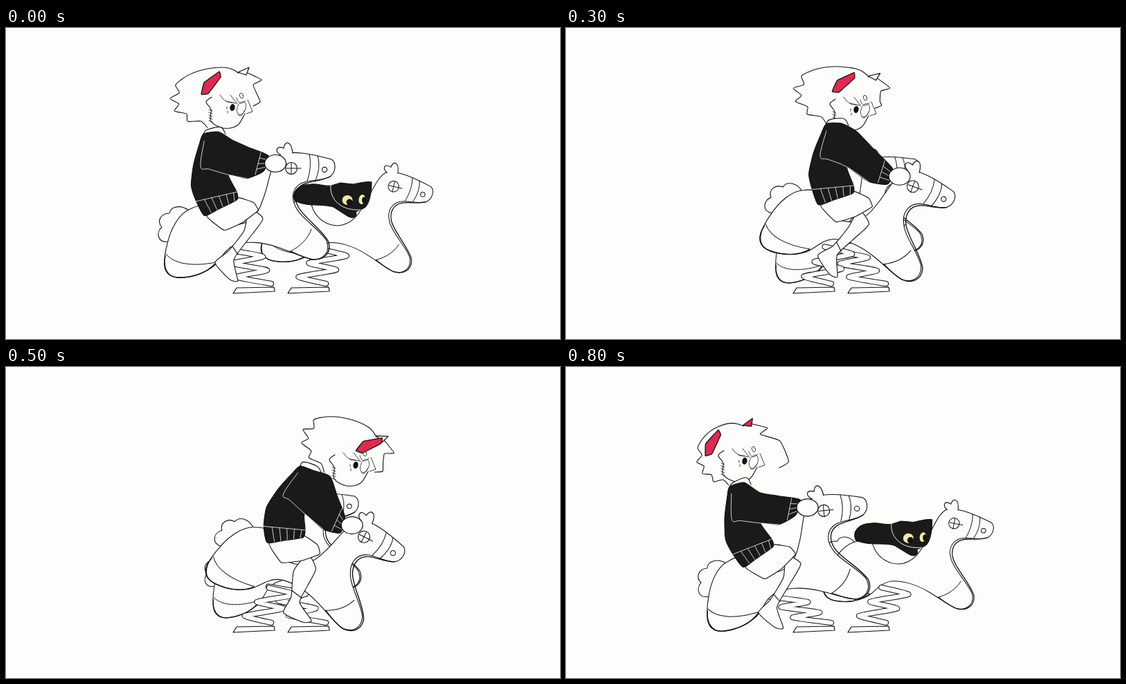
These frames come from a looping animation (800 by 450 pixels, 900 ms). An HTML page with a canvas:

```html
<!DOCTYPE html>
<html lang="en">
<head>
<meta charset="utf-8">
<title>Rocking horses</title>
<style>
  html, body { margin: 0; width: 100%; height: 100%; overflow: hidden; background: #fdfdfb; }
  canvas { display: block; }
</style>
</head>
<body>
<canvas width="800" height="450"></canvas>
<script>
const ctx = document.querySelector('canvas').getContext('2d');
const PAPER = '#fdfdfb', INK = '#111', CLOTH = '#1a1a1a', RED = '#dd2a50', YELLOW = '#f1eda0';
const STEP = 100, FAR_SCALE = 0.91;

// Horses: x, y, angle. Head: eye x, y, tilt. Hair: turn of the ear, backward flow.
// Body: lean of the torso, ankle position along the horse, foot angle.
const upright = { near: [403, 172, 0], far: [558, 200, 13], head: [327, 115, 0], hair: [-31, 90], body: [-5, -78, 40] };
const rising = { near: [429, 167, 3], far: [517, 187, 6], head: [352, 104, 2], hair: [-25, 88], body: [-4, -71, 41] };
const leaning = { near: [503, 197, 20], far: [442, 181, -7], head: [419, 118, 11], hair: [-25, 95], body: [1, -65, 49] };
const diving = { near: [523, 214, 27], far: [441, 177, -6], head: [505, 142, 26], hair: [5, 91], body: [21, -38, 17] };
const sitting = { near: [432, 170, 5], far: [549, 190, 11], head: [388, 116, 1], hair: [-20, 63], body: [8, -41, -8] };
const backward = { near: [360, 178, -6], far: [558, 197, 11.5], head: [258, 136, -12], hair: [-40, 68], body: [-14, -77, 33] };

const mix = (a, b, t) => a.map((v, i) => v + (b[i] - v) * t);
const between = (a, b) => Object.fromEntries(Object.keys(a).map(k => [k, mix(a[k], b[k], 0.5)]));
const poses = [
  upright, between(upright, rising), rising,
  leaning, between(leaning, diving), diving,
  sitting, { ...between(sitting, backward), far: [577, 206, 15] }, backward
];

const radians = degrees => degrees * Math.PI / 180;

// Points given relative to an origin that is turned by an angle.
function local([x, y], angle, ...points) {
  const c = Math.cos(radians(angle)), s = Math.sin(radians(angle));
  return points.map(([dx, dy]) => [x + dx * c - dy * s, y + dx * s + dy * c]);
}

function paint(path, stroke, fill, width = 1.1) {
  if (fill) { ctx.fillStyle = fill; ctx.fill(path); }
  if (stroke) { ctx.strokeStyle = stroke; ctx.lineWidth = width; ctx.stroke(path); }
}

// Smooth curve through the points; bend 0 gives straight edges.
function curve(points, closed = false, bend = 1 / 6) {
  const path = new Path2D(), n = points.length;
  const at = i => closed ? points[(i + n) % n] : points[Math.max(0, Math.min(n - 1, i))];
  path.moveTo(...points[0]);
  for (let i = 0; i < (closed ? n : n - 1); i++) {
    const [p, a, b, q] = [at(i - 1), at(i), at(i + 1), at(i + 2)];
    path.bezierCurveTo(a[0] + (b[0] - p[0]) * bend, a[1] + (b[1] - p[1]) * bend,
      b[0] - (q[0] - a[0]) * bend, b[1] - (q[1] - a[1]) * bend, ...b);
  }
  if (closed) path.closePath();
  return path;
}

function oval(x, y, rx, ry = rx, tilt = 0) {
  const path = new Path2D();
  path.ellipse(x, y, rx, ry, tilt, 0, 2 * Math.PI);
  return path;
}

function placed([x, y, angle], scale, [ox, oy], draw) {
  ctx.save();
  ctx.translate(x, y);
  ctx.rotate(radians(angle));
  ctx.scale(scale, scale);
  ctx.translate(-ox, -oy);
  draw();
  ctx.restore();
}

const horseBody = new Path2D(`M397 183C415 177 440 182 470 190C477 195 477 208 468 215
  C455 222 440 219 428 224C414 230 411 245 418 258C425 275 455 293 463 308C469 325 458 335 443 335
  C428 332 415 325 395 318C370 309 345 308 330 314C312 322 310 340 295 348C280 358 250 366 238 358
  C226 350 228 330 233 312C238 290 250 268 266 262C275 257 283 256 290 256C300 288 355 303 371 248
  C379 230 382 192 397 183Z`);
const horseTail = new Path2D(`M264 264C252 255 238 258 236 268C224 268 217 279 225 288
  C216 296 219 311 234 309L250 290Z`);
const horseEar = new Path2D('M397 184C388 180 389 169 401 174C402 163 412 162 414 181');
const horseLines = new Path2D(`M231 327C242 341 268 346 303 339M441 291C436 305 425 316 411 323
  M438 183C441 195 439 210 435 221M450 185C454 197 451 211 447 220M412 195V212M405 203H426`);
const horseEdge = new Path2D(`M468 215C455 222 440 221 430 226C417 232 415 246 422 259
  C431 275 459 294 466 310C470 326 459 336 443 335C428 332 418 326 411 323
  M230 330C226 346 230 361 250 361C275 361 292 352 303 340`);

function drawHorse(place, scale) {
  placed(place, scale, [403, 172], () => {
    paint(horseTail, INK, PAPER);
    paint(horseBody, INK, PAPER);
    paint(horseEar, INK, PAPER, 1.2);
    paint(horseLines, INK, null, 1);
    paint(horseEdge, INK, null, 1.4);
    paint(oval(412, 203, 8.5), INK);
    paint(oval(460, 205, 3.6), INK);
  });
}

const catShape = new Path2D(`M417 248C412 236 421 224 440 224C452 223 462 228 470 226L483 222
  L501 224C510 223 519 219 528 221C528 232 526 250 519 257C514 261 507 262 505 264
  C508 271 501 275 493 270L473 257C455 251 438 258 417 248Z`);
const catLine = new Path2D('M469 226C467 246 484 263 512 261');

function drawCat([x, y, angle]) {
  placed([x, y, angle - 13], 1, [558, 198], () => {
    paint(catShape, INK, CLOTH);
    paint(catLine, PAPER, null, 0.9);
    paint(oval(493, 247, 7.5, 7), null, YELLOW);
    paint(oval(496, 250, 4.5), null, INK);
    paint(oval(514, 246, 4.5, 7, 0.2), null, YELLOW);
    paint(oval(517, 247, 3, 4.5), null, INK);
  });
}

function drawSpring(baseX, [x, y, angle], scale) {
  const [[topX, topY]] = local([x, y], angle, [-60 * scale, 149 * scale]);
  const turns = 5;
  const points = Array.from({ length: turns + 1 }, (_, i) => {
    const t = i / turns;
    return [topX + (baseX - topX) * t + (i % 2 ? 25 : -22), topY + (370 - topY) * t];
  });
  const coil = curve(points, false, 0.08);
  paint(coil, INK, null, 8.2);
  paint(coil, PAPER, null, 6.2);
  paint(curve([[baseX - 30, 384], [baseX - 25, 376], [baseX + 29, 375], [baseX + 30, 381]], true, 0), INK, PAPER, 1.2);
}

// Hip, hand and knee ride along with the near horse.
function joints({ near, head, body: [lean] }) {
  const [hip, hand, knee] = local(near, near[2], [-99, 72], [-14, 24], [-32, 104]);
  const [neck] = local(hip, lean, [0, -92]);
  return { hip, hand, knee, neck, hipAngle: 0.7 * head[2] - 13 };
}

function drawLegs({ near, body: [, shin, footAngle] }, { hip, knee, hipAngle }) {
  const [ankle] = local(near, near[2], [shin, 157]);
  const [thigh, calf] = local(knee, near[2], [-20, -14], [-27, 17]);
  const [instep, toe, sole, heel, tendon] = local(ankle, footAngle, [7, 2], [31, 22], [20, 28], [-11, 23], [-7, -2]);
  paint(curve([thigh, knee, mix(knee, instep, 0.5), instep, toe, sole, heel, tendon, calf], true, 0.1), INK, PAPER);
  paint(curve([mix(knee, instep, 0.87), mix(calf, tendon, 0.75)]), INK);
  paint(curve(local(hip, hipAngle, [28, 8], [50, 20], [54, 33], [28, 45], [0, 50], [-20, 24]), true, 0.05), INK, PAPER);
}

function drawSweater({ body: [lean] }, { hip, hand, neck, hipAngle }) {
  const white = (...points) => paint(curve(points), PAPER, null, 0.8);
  const [nape, throat, armpit, backTop, back, backLow] =
    local(neck, lean, [-11, 0], [11, -1], [20, 62], [-18, 14], [-29, 43], [-35, 73]);
  const [hemFront, front, belt, rear, hemBack] =
    local(hip, hipAngle, [30, 0], [28, 11], [0, 18], [-23, 23], [-30, 0]);
  const [shoulder, cuffTop, cuffBottom] = [
    [neck[0] + 33, neck[1] + 11], [hand[0] - 10, hand[1] - 11], [hand[0] - 17, hand[1] + 11]
  ];
  const [elbowX, elbowY] = mix(cuffBottom, armpit, 0.48);
  const underarm = [elbowX, elbowY + 8], sleeve = mix(shoulder, cuffTop, 0.48);

  paint(curve([nape, [nape[0] + 5, nape[1] - 6], [throat[0] + 3, throat[1] - 7], [throat[0] + 10, throat[1] + 3]]), INK, PAPER);
  paint(curve([nape, throat, shoulder, sleeve, cuffTop, cuffBottom, underarm, armpit,
    hemFront, front, belt, rear, hemBack, backLow, back, backTop], true, 0.1), INK, CLOTH);

  white(mix(backTop, throat, 0.25), mix(back, armpit, 0.2), mix(back, armpit, 0.45), armpit, underarm);
  white(hemBack, hemFront);
  for (let t = 0.2; t < 0.95; t += 0.18) white(mix(hemBack, hemFront, t), mix(rear, front, t));
  const bandTop = mix(cuffTop, sleeve, 0.42), bandBottom = mix(cuffBottom, underarm, 0.5);
  white(bandTop, bandBottom);
  for (const t of [0.25, 0.5, 0.75]) white(mix(bandTop, bandBottom, t), mix(cuffTop, cuffBottom, t));
  paint(oval(...hand, 15.5, 12.5), INK, PAPER, 1.2);
}

const jaw = [[-30, -15], [-38, -8], [-31, 3], [-31, 20], [-13, 30], [7, 26], [18, 9]];
const faceLines = new Path2D(`M-18-18C-12-9-7-7 0-7M-9-9L5-6M-3-18L7-5M6-14C8-6 13-3 19-10
  M8 10C10 15 15 11 17 5M-8-1V2M-7 5V8M22-11L29 6L20 9`);

function drawFace() {
  paint(curve(jaw), INK);
  for (let y = 3; y <= 20; y += 4) paint(curve([[-34, y], [-29, y + 2]]), INK, null, 0.8);
  paint(oval(0, 0, 3.6, 5, 0.2), null, INK);
  paint(faceLines, INK, null, 0.8);
  paint(oval(13, 1, 6, 10, 0.35), INK, null, 0.7);
  paint(oval(13, -17, 2.5, 4, -0.3), INK, null, 0.8);
}

// The less the hair flows back, the further it reaches over the face.
function drawHair([turn, flow]) {
  const reach = 130 - flow, count = 16;
  const outline = Array.from({ length: count + 1 }, (_, i) => {
    const a = radians(305 - 198 * i / count), c = Math.cos(a), s = Math.sin(a);
    const tip = s > -0.25 && i % 2 ? 0.85 : 1;
    return [-14 + c * tip * (c < 0 ? flow - 14 : 40), -12 + s * tip * (s < 0 ? 46 : 43)];
  });
  paint(curve(outline, false, 0.12), INK);
  paint(curve([[22, -50], [42, -40], [30, -33], [reach * 0.9, -18], [reach, reach - 48], [reach * 0.75, reach - 42]], false, 0.08), INK);
  paint(curve([[8, -51], [24, -58], [20, -47]], true, 0), INK, reach > 55 ? RED : PAPER, 1.2);
  placed([turn, -34, 0], 1, [0, 0], () =>
    paint(curve([[12, -18], [14, -10], [-4, 14], [-14, 15], [-10, -2]], true, 0.03), INK, RED, 1.3));
}

function drawScene(pose) {
  ctx.fillStyle = PAPER;
  ctx.fillRect(0, 0, 800, 450);
  ctx.lineJoin = ctx.lineCap = 'round';
  const { near, far, head, hair } = pose, rig = joints(pose);
  drawHorse(far, FAR_SCALE);
  if (far[0] > near[0]) drawCat(far);
  drawSpring(437, far, FAR_SCALE);
  drawSpring(358, near, 1);
  drawHorse(near, 1);
  drawLegs(pose, rig);
  placed([head[0], head[1], 0], 1, [0, 0], drawFace);
  placed(head, 1, [0, 0], () => drawHair(hair));
  drawSweater(pose, rig);
}

const start = performance.now();
function tick() {
  drawScene(poses[Math.floor((performance.now() - start) / STEP) % poses.length]);
  requestAnimationFrame(tick);
}
tick();
</script>
</body>
</html>
```
